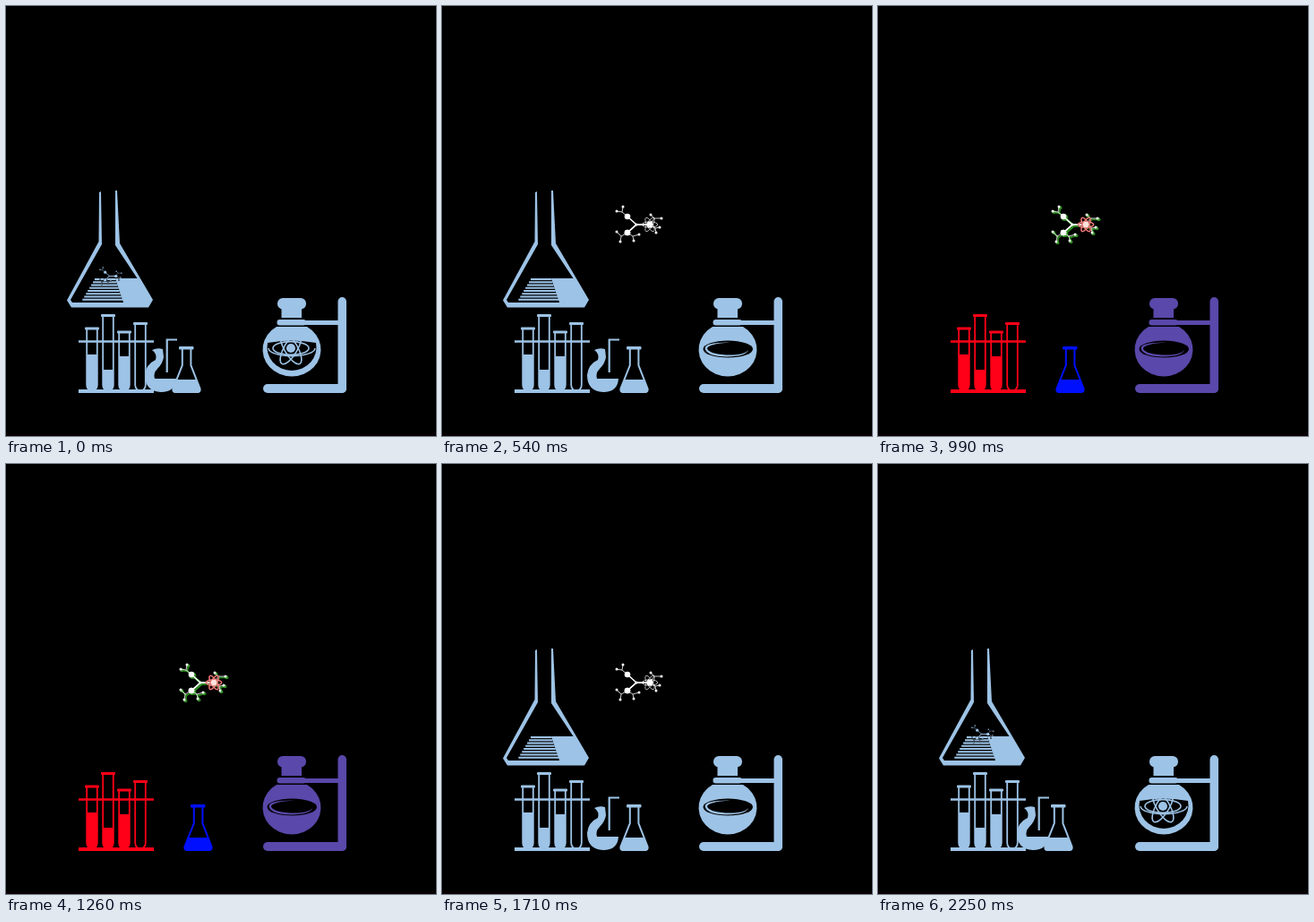
Recreate the animation shown at these times as an HTML page with a canvas. Size 480 by 480 pixels, loop 2.34 s.

```html
<!DOCTYPE html>
<html lang="en">
<head>
<meta charset="utf-8">
<title>Chemistry set</title>
<style>
html, body { margin: 0; width: 100%; height: 100%; overflow: hidden; background: #000; }
canvas { display: block; width: 480px; height: 480px; }
</style>
</head>
<body>
<canvas id="stage" width="480" height="480"></canvas>
<script>
const ctx = document.getElementById('stage').getContext('2d');
const STEP = 90, COUNT = 26;
const SKY = '#9dc3e6', WHITE = '#fff', MAGENTA = '#ff00ff', RED = '#ff0018', BLUE = '#0010ff', PURPLE = '#5a48aa';

// x, y, scale for each step of the flight
const moleculePath = [[115.5, 301.5, .48], [115, 262, .6], [115, 205, .8], [115, 150, 1], [149, 165, 1], [183, 204, 1], [217, 244, 1]];
const atomPath = [[318, 382, 2.3], [318, 350, 1.8], [318, 310, 1.5], [318, 268, 1.3], [290, 249, 1.2], [261, 244, 1.1], [232, 244, 1]];

const allSky = { flask: SKY, tubes: SKY, retort: SKY, small: SKY, round: SKY };
const pale = { flask: MAGENTA, retort: WHITE, small: WHITE };
const deep = { tubes: RED, small: BLUE, round: PURPLE };
const full = { ...pale, ...deep };
const flashes = [deep, full, pale, full, deep, full];

function fillPath(d, color) {
  ctx.fillStyle = color;
  ctx.fill(new Path2D(d), 'evenodd');
}

function strokePath(d, color, width) {
  ctx.strokeStyle = color;
  ctx.lineWidth = width;
  ctx.stroke(new Path2D(d));
}

function box(x, y, w, h, color, radius = 0) {
  ctx.fillStyle = color;
  ctx.beginPath();
  ctx.roundRect(x, y, w, h, radius);
  ctx.fill();
}

function dot(x, y, r, color) {
  ctx.fillStyle = color;
  ctx.beginPath();
  ctx.arc(x, y, r, 0, Math.PI * 2);
  ctx.fill();
}

function drawFlask(c) {
  fillPath('M104 208L106 207L107 266L72 328L74 331H131L122 304H146.5L122 267L122 206L124 206L127 265L164 328L159 336.5H73L68 328.5L103.5 263Z', c);
  for (let i = 0; i < 8; i++) {
    const y = 304 + i * 3.25;
    const left = 99 - (y - 304) * .6;
    box(left, y, 122.5 + (y - 304) * .33 - left, 2.1, c);
  }
}

function drawTubes(c) {
  box(81, 373.3, 84, 2.5, c);
  box(81, 428, 84, 4, c);
  for (const [x, top, level] of [[96, 358.5, 389], [114, 344, 406], [132, 362.5, 391], [150, 353, 0]]) {
    box(x - 8, top, 16, 3, c, 1);
    strokePath(`M${x - 5.8} ${top + 2}V423A5.8 6.5 0 0 0 ${x + 5.8} 423V${top + 2}`, c, 1.8);
    if (level) box(x - 6, level, 12, 430 - level, c, [0, 0, 6, 6]);
  }
}

function drawRetort(c, dx) {
  ctx.save();
  ctx.translate(dx, 0);
  fillPath('M170 384Q176 381 182 383L183 392Q182 399 176 405Q171 410 173 416H197Q196 431 180 431Q162 430 162 412Q163 400 174 395Q176 388 170 384Z', c);
  strokePath('M198 372.5H186.7V409', c, 2.2);
  ctx.restore();
}

function drawSmallFlask(c, dx) {
  ctx.save();
  ctx.translate(dx, 0);
  box(206, 380, 16.5, 3.5, c, 1);
  strokePath('M209.8 382V401L199.5 427Q198.5 431 203 431H226Q230.5 431 229.5 427L219.4 401V382', c, 2);
  fillPath('M204 417H225L230 428Q230 432 226 432H203Q198.5 432 199 428Z', c);
  ctx.restore();
}

function drawRoundFlask(c, filled) {
  box(303, 326, 32, 12.5, c, 6);
  box(307.5, 336, 22.5, 12, c);
  box(302.5, 350, 32.5, 6.5, c, 3);
  box(330, 351, 45, 5, c);
  box(370.5, 325, 9.5, 107, c, [5, 5, 5, 0]);
  box(287, 422, 93, 10, c, 5);
  fillPath('M302 358H336A32.5 30 0 1 1 302 358Z', c);
  if (filled) {
    fillPath('M291.5 383A27.7 9.5 0 1 0 347 383A27.7 9.5 0 1 0 291.5 383Z', '#000');
    fillPath('M342 384Q338 390 317 389.5Q297 388 296 382Q298 377 322 375.5Q294 375 293.5 382Q295 391 318 391.5Q340 391 342 384Z', c);
  } else {
    fillPath('M292 376Q319 371 346 376A27.5 26 0 1 1 292 376Z', '#000');
    strokePath('M293 382A25.5 8.5 0 1 0 345 382', c, 1.5);
  }
}

// Each branch: hub, joint, then two outer atoms, around the centre
const branches = [
  [-10, -9, -16, -14, -22, -15, -15, -20],
  [-10, 9, -17, 13, -22, 8, -18, 19],
  [-10, 9, -4, 13, -3, 18, 3, 11],
  [15, 0, 20, -7, 16, -11, 28, -7],
  [15, 0, 21, 4, 26, 3, 22, 9]
];

function moleculeShape(color, grow) {
  for (const [hx, hy, jx, jy, ax, ay, bx, by] of branches) {
    strokePath(`M0 0L${hx} ${hy}`, color, 1.5 + grow * 2);
    strokePath(`M${hx} ${hy}L${jx} ${jy}L${ax} ${ay}M${jx} ${jy}L${bx} ${by}`, color, .8 + grow * 2);
    dot(hx, hy, 3.3 + grow, color);
    dot(ax, ay, 1.5 + grow, color);
    dot(bx, by, 1.5 + grow, color);
  }
  dot(0, 0, 1.5 + grow, color);
}

function drawMolecule([x, y, scale], color, glow) {
  ctx.save();
  ctx.translate(x, y);
  ctx.scale(scale, scale);
  if (glow) {
    ctx.save();
    ctx.translate(1.4, 1.3);
    moleculeShape('#2f8a22', .5);
    ctx.restore();
  } else if (scale < 1) {
    moleculeShape('#000', .7);
  }
  moleculeShape(color, 0);
  ctx.restore();
}

function orbits(color, width) {
  ctx.strokeStyle = color;
  ctx.lineWidth = width;
  for (let i = 0; i < 3; i++) {
    ctx.beginPath();
    ctx.ellipse(0, 0, 8.7, 3.2, i * Math.PI / 3, 0, Math.PI * 2);
    ctx.stroke();
  }
}

function drawAtom([x, y, scale], color, glow) {
  ctx.save();
  ctx.translate(x, y);
  ctx.scale(scale, scale);
  if (glow) orbits('#c84848', 1.7);
  orbits(glow ? '#f3b4ae' : color, glow ? .6 : .7);
  dot(0, 0, scale > 1 ? 2.2 : 3.2, glow ? '#ffe2dc' : color);
  ctx.restore();
}

function draw(state) {
  const flight = Math.min(state, 6);
  const glow = state > 6;
  const colors = glow ? flashes[state - 7] : allSky;
  const part = flight / 6;
  const away = 1 - part;
  const mix = [157, 195, 230].map(v => Math.round(v + (255 - v) * part));
  const tint = `rgb(${mix})`;

  ctx.fillStyle = '#000';
  ctx.fillRect(0, 0, 480, 480);
  box(0, 477, 480, 3, '#080003');
  if (colors.flask) drawFlask(colors.flask);
  if (colors.tubes) drawTubes(colors.tubes);
  if (colors.retort) drawRetort(colors.retort, -7 * away);
  if (colors.small) drawSmallFlask(colors.small, -13 * away);
  if (colors.round) drawRoundFlask(colors.round, flight > 0);
  drawMolecule(moleculePath[flight], tint, glow);
  drawAtom(atomPath[flight], tint, glow);
}

const start = performance.now();
function tick() {
  const step = Math.floor((performance.now() - start) / STEP) % COUNT;
  draw(Math.min(step, COUNT - 1 - step));
  requestAnimationFrame(tick);
}
tick();
</script>
</body>
</html>
```
